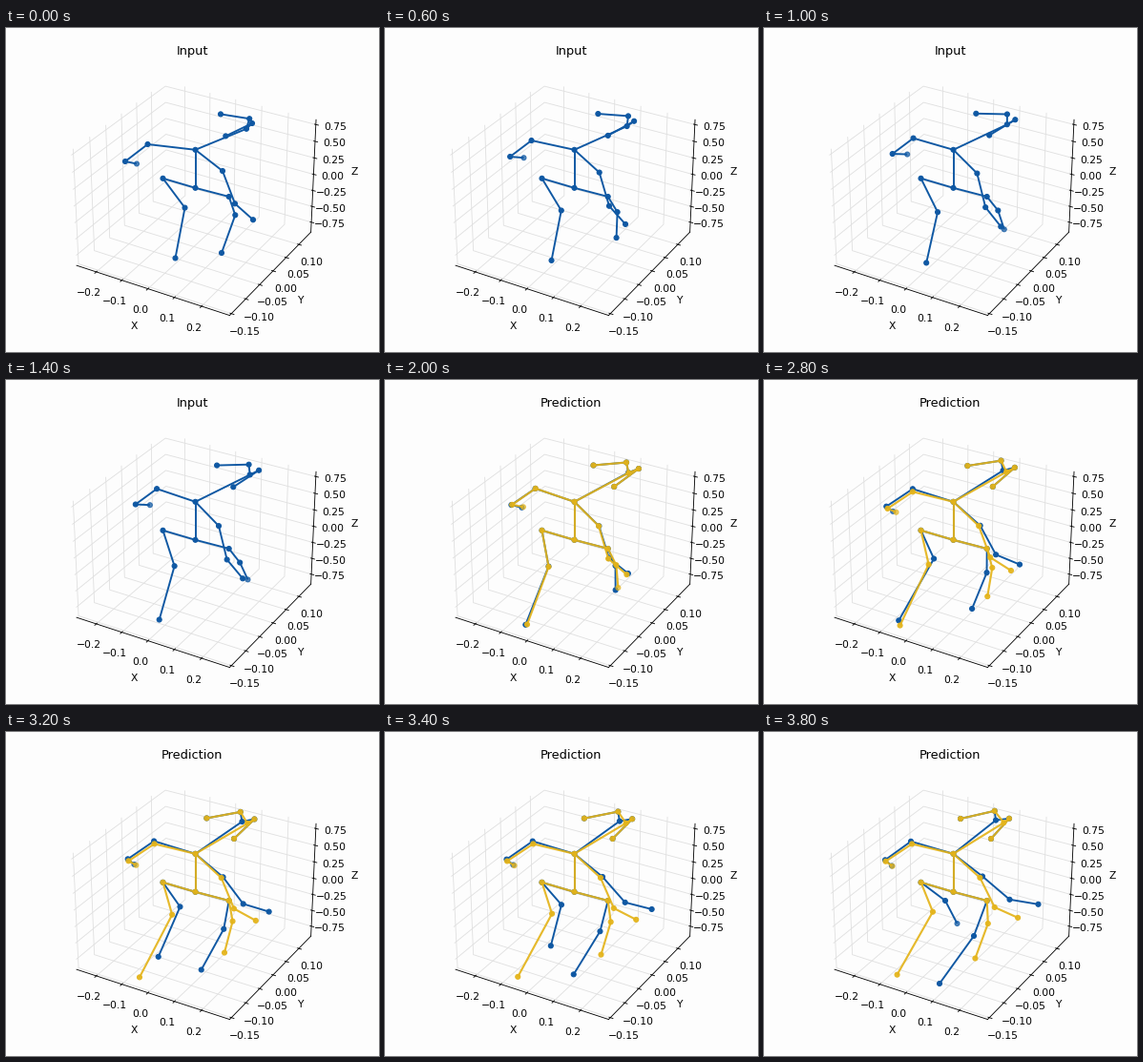
A matplotlib script for the animation above (4000 ms loop, 391 px wide and 340 px high).

```python
import numpy as np
import matplotlib.pyplot as plt
from matplotlib.animation import FuncAnimation
from matplotlib.collections import LineCollection
from matplotlib.colors import to_rgba

W, H, DPI = 391, 340, 77.2
FRAMES, STEP_MS, SWITCH = 20, 200, 10
BACK, GRID = "#fdfdfd", "#e0e0e0"
BLUE, GOLD = "#0f58a3", "#e4b41a"

CHAINS = ["root neck", "root lhip lknee lfoot", "root rhip rknee rfoot",
          "neck lelbow lwrist lhand", "neck relbow rwrist rhand",
          "neck head ear1 tip1", "head ear2 tip2"]
BONES = [pair for c in CHAINS for pair in zip(c.split(), c.split()[1:])]

# Way points of each joint in stage pixels, evenly spread over the loop.
trunk = dict(root=[(198.5, 167.8)], neck=[(198.5, 127.8)],
             lhip=[(164.5, 157.8)], rhip=[(233.7, 177)])
legs = dict(
    lknee=[(187.5, 188.6), (182.5, 193), (171.5, 196), (178.6, 187), (190, 177)],
    lfoot=[(177.5, 241.5), (171, 246), (149, 256.5), (142.5, 251), (202.5, 201)],
    rknee=[(240.3, 196.3), (245.5, 191.3), (236.5, 199.5), (220, 214)],
    rfoot=[(226, 236), (254, 209), (226, 234), (184, 264)])
left_arm = dict(
    lelbow=[(148.5, 122), (157.8, 114.5), (156.3, 114.2), (154, 114.8)],
    lwrist=[(125, 140), (135.8, 130.8), (129, 132.3), (127, 134.3)],
    lhand=[(137, 142.5), (151.3, 131.3), (136.5, 137), (134, 140.5)])
right_arm = dict(
    relbow=[(227, 150), (223, 153), (226, 153), (229, 151.5)],
    rwrist=[(240, 184.3), (231.5, 188.5), (240, 184.8), (257.5, 175.8)],
    rhand=[(259, 201.2), (247.7, 208.7), (263.5, 196.7), (287.5, 180.8)])
head = dict(head=[(252, 105.8), (255.4, 97.5), (243, 92.6)])
tips = dict(ear1=[(255.2, 95.2), (253.4, 86.8), (241.7, 82.8)],
            tip1=[(225, 90.4), (219, 89.5), (206, 91)],
            ear2=[(258, 100), (266, 93.3), (257, 90.8)],
            tip2=[(230.3, 113.4), (240, 112), (238, 112)])
joints = trunk | legs | left_arm | right_arm | head | tips


def along(points, t):
    """Smooth (Hermite) curve through the way points."""
    p = np.array(points, float)
    if len(p) == 1:
        return p[0]
    s = t / (FRAMES - 1) * (len(p) - 1)
    k = int(np.clip(s, 0, len(p) - 2))
    u, slope = s - k, np.gradient(p, axis=0)
    ease = u * u * (3 - 2 * u)
    return (p[k] + ease * (p[k + 1] - p[k])
            + u * (1 - u)**2 * slope[k] - u * u * (1 - u) * slope[k + 1])


def real_pose(t):
    return {name: along(p, t) for name, p in joints.items()}


def guessed_pose(t):
    """The model moves its limbs too slowly and lets the left arm sag."""
    since = t - SWITCH
    slow = SWITCH - .5 + .44 * since
    sag = np.array([-1, 3.2]) * min(1, since / 4)
    return {name: along(p, t if name in tips else slow) + sag * (name in left_arm)
            for name, p in joints.items()}


plt.rcParams["grid.color"] = GRID
fig = plt.figure(figsize=((W + 1e-6) / DPI, (H + 1e-6) / DPI), dpi=DPI, facecolor=BACK)

# chart box
side, left, low = 285.5, 52.5, 20.4
ax = fig.add_axes([left / W, low / H, side / W, side / H], projection="3d")
ax.set_facecolor(BACK)
ax.set(xlabel="X", ylabel="Y", zlabel="Z",
       xticks=np.linspace(-.2, .2, 5), yticks=np.linspace(-.15, .1, 6),
       zticks=np.linspace(-.75, .75, 7))
ax.set(xlim=(-.278, .302), ylim=(-.156, .149), zlim=(-.908, .821))
for axis in (ax.xaxis, ax.yaxis, ax.zaxis):
    axis.set_pane_color((1, 1, 1, 0))
title = ax.set_title("Input")

# pixel layer for the figures
layer = fig.add_axes([0, 0, 1, 1])
layer.set(xlim=(0, W), ylim=(H, 0))
layer.axis("off")


class Skeleton:
    def __init__(self, color, alpha, width, z):
        self.rgba = to_rgba(color, alpha)
        self.lines = LineCollection([], colors=[self.rgba], linewidths=width, zorder=z)
        layer.add_collection(self.lines, autolim=False)
        self.dots = layer.scatter([], [], s=22, zorder=z + 1)

    def draw(self, pts):
        self.lines.set_segments([[pts[a], pts[b]] for a, b in BONES])
        colors = np.tile(self.rgba, (len(pts), 1))
        for i, (name, p) in enumerate(pts.items()):
            # parts turned away from the viewer look paler
            if name == "lhand" or (name.endswith("foot") and p[1] < 219):
                colors[i, 3] *= .72
        self.dots.set_offsets(list(pts.values()))
        self.dots.set_color(colors)

    def show(self, on):
        self.lines.set_visible(on)
        self.dots.set_visible(on)


real = Skeleton(BLUE, 1, 1.8, 2)
model = Skeleton(GOLD, .92, 2, 4)


def update(i):
    predicting = i >= SWITCH
    title.set_text("Prediction" if predicting else "Input")
    real.draw(real_pose(i))
    model.show(predicting)
    if predicting:
        model.draw(guessed_pose(i))
    return []


anim = FuncAnimation(fig, update, frames=FRAMES, interval=STEP_MS,
                     repeat=True, repeat_delay=0, blit=False)
plt.show()
```
